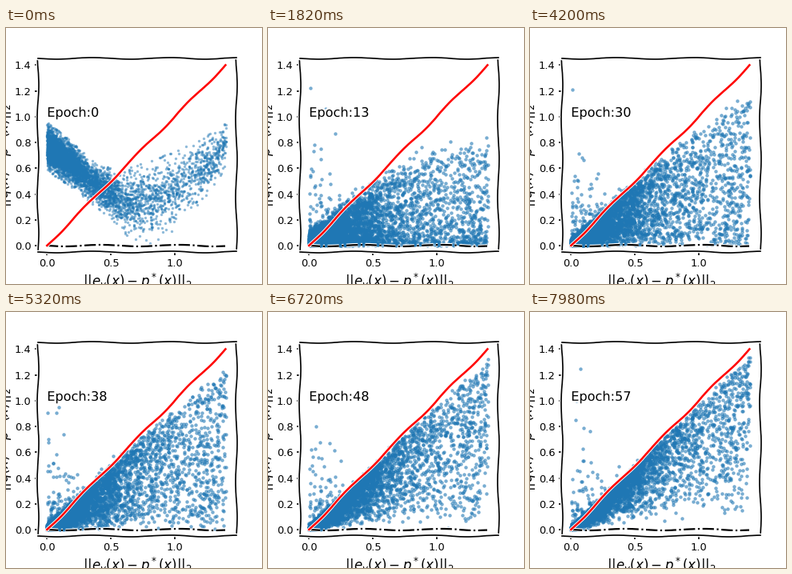
These frames come from a looping animation (320x320 px, 8 s). A matplotlib script:

```python
import numpy as np
import matplotlib.pyplot as plt
from matplotlib.animation import FuncAnimation
from matplotlib.patheffects import withStroke

STEP, EPOCH_MS, LOOP_MS = 20, 140, 8000
BLUE = "#1f77b4"

plt.rcParams.update({
    "font.family": "DejaVu Sans",
    "mathtext.fontset": "dejavusans",
})
halo = [withStroke(linewidth=4, foreground="white")]


def wobble(artist):
    """Give a line the hand-drawn look."""
    artist.set_sketch_params(1, 100, 2)
    artist.set_path_effects(halo)


# Per-point constants: error size x, starting height, slow random drift.
rng = np.random.default_rng(7)
x = np.concatenate([rng.exponential(0.22, 3400),
                    1.41 * rng.random(1600) ** 0.9])
x = x[x < 1.405]
n = len(x)
z1, z2 = rng.normal(size=(2, n))
speed = rng.normal(0, 0.06, n)
stray = (rng.random(n) < 0.035) * np.exp(-(x / 0.28) ** 2)

knots = [0, 0.2, 0.4, 0.6, 0.8, 1.0, 1.2, 1.4]
mid = np.interp(x, knots, [0.78, 0.63, 0.46, 0.35, 0.34, 0.44, 0.58, 0.78])
width = np.interp(x, knots, [0.075, 0.07, 0.065, 0.1, 0.13, 0.12, 0.1, 0.07])
start = np.abs(mid + width * np.clip(z1, -2.6, 2.4))


def heights(epoch):
    """Distances after the given epoch; they climb towards y = x."""
    if epoch == 0:
        return start
    noise = np.random.default_rng(100 + epoch)
    z = z1 * np.cos(speed * epoch) + z2 * np.sin(speed * epoch)
    z = 0.93 * z + 0.37 * noise.normal(size=n)
    v = 1 / (1 + np.exp(-1.7 * z))
    late = epoch - 13
    power = 1.3 * np.exp(-late / 34) * (0.7 + 0.5 * x)
    cap = 0.98 / (1 + 0.4 * np.exp(-late / 13) * x ** 2)
    y = x * cap * v ** power
    y += (0.045 * np.exp(-late / 25) + 0.006) * noise.normal(size=n)
    y += stray * noise.exponential(0.2, n)
    return np.abs(y + (start - y) * 0.3 ** epoch)


fig = plt.figure(figsize=(4, 4), dpi=80, facecolor="white")
ax = fig.add_axes([0.125, 0.125, 0.775, 0.755])
ax.set(xlim=(-0.0707, 1.485), ylim=(-0.05, 1.45))
ax.set_xticks([0, 0.5, 1])
ax.set_yticks(np.arange(8) * 0.2)
ax.xaxis.set_major_formatter("{x:.1f}")
ax.yaxis.set_major_formatter("{x:.1f}")
ax.tick_params(labelsize=11.7, length=4, width=1.5, pad=3.5)
for spine in ax.spines.values():
    spine.set_linewidth(1.5)
    wobble(spine)

dots, = ax.plot(x, start, ".", color=BLUE, alpha=0.5, ms=6, zorder=1)
bound, = ax.plot([0, 1.4], [0, 1.4], color="red", lw=2.3, zorder=3)
base, = ax.plot([0, 1.4], [0, 0], "-.", color="black", lw=2, zorder=2)
wobble(bound)
wobble(base)
label = ax.text(0, 1, "", fontsize=14.5, path_effects=halo, zorder=4)

fig.text(164 / 320, -3 / 320, r"$||e_y(x) - p^*(x)||_2$", fontsize=15,
         ha="center", va="baseline")
fig.text(4 / 320, 161 / 320, r"$||q(x) - p^*(x)||_2$", fontsize=15,
         rotation=90, rotation_mode="anchor", ha="center", va="baseline")


def update(frame):
    epoch = frame * STEP // EPOCH_MS
    dots.set_ydata(heights(epoch))
    dots.set_markeredgewidth(1 if epoch else 0)
    label.set_text(f"Epoch:{epoch}")
    return dots, label


anim = FuncAnimation(fig, update, frames=LOOP_MS // STEP, interval=STEP,
                     repeat=True, repeat_delay=0)
plt.show()
```
